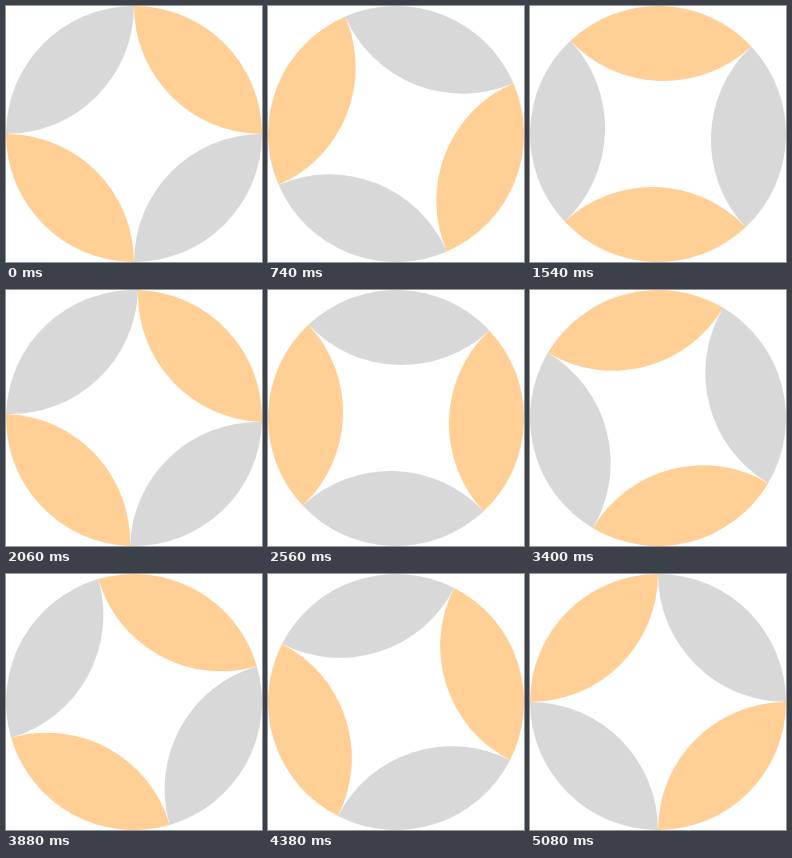
These frames come from a looping animation (256 px wide and 256 px high, 5880 ms). An HTML page with a canvas:

```html
<!DOCTYPE html>
<html lang="en">
<head>
<meta charset="utf-8">
<title>Turning lenses</title>
<style>
  html, body { margin: 0; width: 100%; height: 100%; overflow: hidden; background: #fff; }
  canvas { display: block; width: 256px; height: 256px; }
</style>
</head>
<body>
<canvas id="stage" width="256" height="256"></canvas>
<script>
const ctx = document.getElementById('stage').getContext('2d');
const SIZE = 256, R = SIZE / 2;
const COLORS = ['#ffcf96', '#d8d8d8'];
const TICK = 20, LOOP = 5880;
const QUARTERS = 5, STEPS = 50;   // each quarter turn shows both of its end poses
const LAST_TICK = QUARTERS * (STEPS + 1) - 1;

function angleAt(ms) {
  const tick = Math.min(Math.floor(ms / TICK), LAST_TICK);
  const quarter = Math.floor(tick / (STEPS + 1));
  const step = tick % (STEPS + 1);
  return (quarter + step / STEPS) * Math.PI / 2;
}

function drawLens(color) {
  ctx.beginPath();
  ctx.arc(0, 0, R, -Math.PI / 2, 0);
  ctx.arc(R, -R, R, Math.PI / 2, Math.PI);
  ctx.fillStyle = color;
  ctx.fill();
}

function draw(ms) {
  ctx.setTransform(1, 0, 0, 1, 0, 0);
  ctx.fillStyle = '#fff';
  ctx.fillRect(0, 0, SIZE, SIZE);
  ctx.translate(R, R);
  ctx.rotate(angleAt(ms));
  for (let i = 0; i < 4; i++) {
    drawLens(COLORS[i % 2]);
    ctx.rotate(Math.PI / 2);
  }
}

const start = performance.now();
function frame() {
  draw((performance.now() - start) % LOOP);
  requestAnimationFrame(frame);
}
frame();
</script>
</body>
</html>
```
